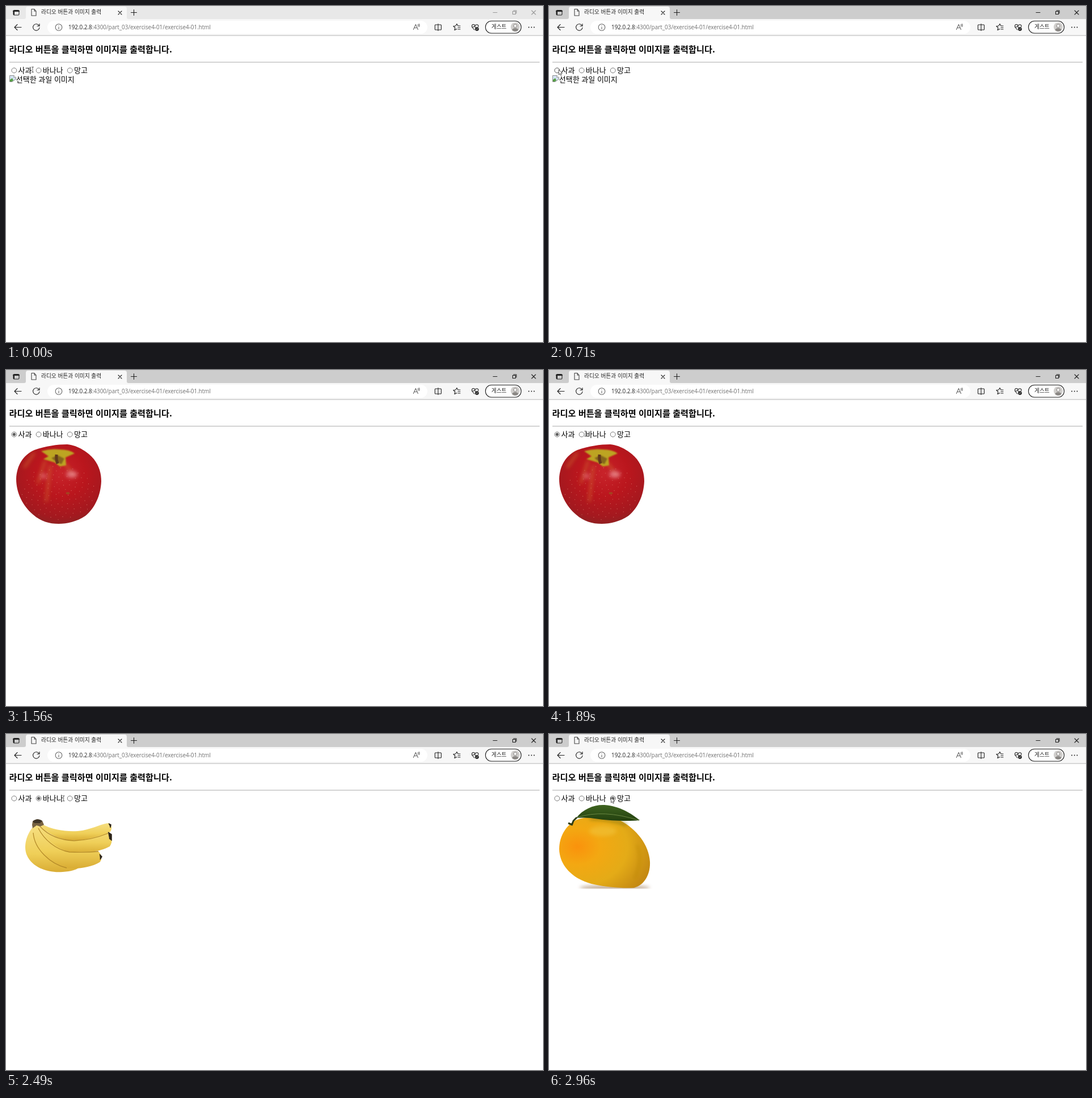
These frames come from a looping animation (947x592 px, 3830 ms). An HTML page:

```html
<!DOCTYPE html>
<html lang="ko">
<head>
<meta charset="utf-8">
<title>라디오 버튼과 이미지 출력</title>
<style>
  html, body { margin: 0; width: 100%; height: 100%; overflow: hidden; background: #fff; }
  svg { display: block; }
  text { font-family: "Noto Sans CJK KR", "Noto Sans CJK", sans-serif; font-size: 13px; }
  .line { fill: none; stroke: #222; stroke-width: 1.1; stroke-linecap: round; stroke-linejoin: round; }
  .small { font-size: 9.7px; fill: #222; }
  .url { font-family: "Open Sans", "Noto Sans", sans-serif; font-size: 9.9px; fill: #707070; }
  .ring { fill: #fff; stroke: #767676; }
  .dot { fill: #606060; }
</style>
</head>
<body>
<svg width="947" height="592" viewBox="0 0 947 592">
  <defs>
    <radialGradient id="red" cx=".52" cy=".36" r=".66">
      <stop offset="0" stop-color="#c8232a"/><stop offset=".45" stop-color="#ba161d"/>
      <stop offset=".85" stop-color="#a3191f"/><stop offset="1" stop-color="#8e2222"/>
    </radialGradient>
    <radialGradient id="gold" cx=".2" cy=".42" r=".85">
      <stop offset="0" stop-color="#fa920c"/><stop offset=".3" stop-color="#f3a812"/>
      <stop offset=".65" stop-color="#e4ab17"/><stop offset="1" stop-color="#c58a12"/>
    </radialGradient>
    <linearGradient id="yellow" x2="0" y2="1">
      <stop offset="0" stop-color="#f6df83"/><stop offset=".6" stop-color="#efcf58"/>
      <stop offset="1" stop-color="#d9ac34"/>
    </linearGradient>
    <linearGradient id="leaf" x2="0" y2="1">
      <stop offset="0" stop-color="#3f6420"/><stop offset="1" stop-color="#23400f"/>
    </linearGradient>
    <filter id="soft" x="-50%" y="-50%" width="200%" height="200%"><feGaussianBlur stdDeviation="3"/></filter>
    <filter id="edge"><feGaussianBlur stdDeviation="1.2"/></filter>
    <clipPath id="photo"><path d="M6 122H190V272.500H6Z"/></clipPath>
  </defs>

  <!-- title bar -->
  <path id="bar" d="M0 0H947V23H0Z"/>
  <path d="M32 23Q35 23 35 20V5Q35 1 39 1H209Q213 1 213 5V20Q213 23 216 23Z" fill="#f7f7f7"/>
  <g class="line">
    <rect x="13" y="7.500" width="10" height="8.500" rx="1.500"/>
    <path d="M13 9H23M14 9V15" stroke-width="2"/>
    <path d="M45 5.500H50L53 9V17H45ZM50 5.500V9H53" stroke="#444"/>
    <path d="M198 9L204 15M204 9L198 15M220.500 11.500H230.500M225.500 6.500V16.500"/>
  </g>
  <path id="buttons" class="line" d="M859 11.500H866M893.500 9.500H898.500V14.500H893.500ZM895 8H900V13M927 8L934 15M934 8L927 15"/>
  <text class="small" x="62" y="14.400">라디오 버튼과 이미지 출력</text>

  <!-- toolbar -->
  <path d="M0 23H947V52H0Z" fill="#f7f7f7"/>
  <path d="M0 52H947" stroke="#b4b4b4"/>
  <rect x="73" y="26" width="670" height="23" rx="11.500" fill="#fff"/>
  <g class="line">
    <path d="M27 37.500H15.500M20 32.500L15 37.500L20 42.500"/>
    <path d="M58.500 35A5.700 5.700 0 1 0 59 38M59 31.500V35.300H55"/>
    <g stroke="#666"><circle cx="93" cy="37.500" r="5.800"/><path d="M93 37V40.500M93 34.500V34.600"/></g>
    <path d="M718.500 41.500L722.500 32.500L726.500 41.500M720 38.500H725M726.500 32.500Q727.500 34 726.500 35.500M728.300 31.500Q730 34 728.300 36.500" stroke="#666"/>
    <path d="M761 33H757.500Q756.500 33 756.500 34V41Q756.500 42 757.500 42H761M763 33H766.500Q767.500 33 767.500 34V41Q767.500 42 766.500 42H763M762 31.500V43.500"/>
    <path d="M795 40.500L791 42.500L792 38.500L789 35.500L793 35L795 31.500L797 35H801M797 38H801M797 41H801"/>
    <path d="M826 42L822 37.500Q820.500 33 824 32.500Q826.500 32.500 827.500 34.500Q829 32 831.500 33Q834 34.500 832.500 37M822 37H825L826.500 35L828 38"/>
    <circle cx="830.500" cy="40.500" r="2.800" fill="#222"/><path d="M829.300 40.500L830.300 41.500L832 39.500" stroke="#fff" stroke-width=".8"/>
    <rect x="845.500" y="26.500" width="63" height="21.500" rx="10.700" style="fill:#fff"/>
  </g>
  <circle cx="898" cy="37" r="8" fill="#d0cecc"/>
  <path d="M892.500 42.500Q893 39 898 39Q903 39 903.500 42.500Q898 47.500 892.500 42.500Z" fill="#8b8885"/>
  <circle cx="898" cy="35" r="3" fill="#f0efee" stroke="#8b8885"/>
  <path d="M922 37.500h0M926.700 37.500h0M931.400 37.500h0" class="line" style="stroke-width:2"/>
  <text class="small" x="856" y="40.400">게스트</text>
  <text class="url" x="110" y="41"><tspan fill="#222">192.0.2.8</tspan>:4300/part_03/exercise4-01/exercise4-01.html</text>

  <!-- page -->
  <text x="5.500" y="81.500" style="font-size:15.200px;font-weight:700">라디오 버튼을 클릭하면 이미지를 출력합니다.</text>
  <path d="M6 99H941" stroke="#a8a8a8"/>
  <g id="radios"></g>

  <g id="alt">
    <path d="M6.500 122.500H14L17.500 126V129L14 131L11 133.500H6.500Z" fill="#d5e3f3" stroke="#8d8d8d"/>
    <path d="M7 133V130L11 127L13 131L10.500 133Z" fill="#56a045"/>
    <path d="M14 122.500V126H17.500" fill="#fff" stroke="#8d8d8d"/>
    <text x="17.800" y="133.700">선택한 과일 이미지</text>
  </g>

  <g id="apple">
    <path d="M18 192C19 168 30 150 50 141C70 134 90 131 108 131C128 133 146 146 155 157C165 170 168 183 168 196C167 222 156 244 140 257C125 267 108 271 93 271C76 271 62 267 48 255C30 240 18 217 18 192Z" fill="url(#red)"/>
    <g filter="url(#soft)">
      <path d="M69 160L56 200M78 168L71 232M103 164L121 187M50 146L32 172" fill="none" stroke="#d0662c" stroke-width="4" opacity=".65"/>
      <ellipse cx="116" cy="184" rx="10" ry="6" fill="#ee929a" opacity=".7"/>
      <ellipse cx="66" cy="187" rx="6" ry="5" fill="#e6737b" opacity=".6"/>
    </g>
    <g filter="url(#edge)">
      <path d="M62 143Q78 138 94 140Q112 140 121 147L105 154L106 168L95 170L86 163L66 157L75 152Z" fill="#bda424"/>
      <path d="M80 155L91 150L103 156L98 166L88 162Z" fill="#86651a"/>
    </g>
    <path d="M89 149Q88 157 91 165" fill="none" stroke="#63391b" stroke-width="5"/>
    <ellipse cx="109" cy="217" rx="3.500" ry="2" fill="#a4421f"/>
    <g id="specks" fill="#e28f7c" opacity=".7"></g>
  </g>

  <g id="banana" fill="url(#yellow)">
    <path d="M48 163C34 180 31 200 37 214C47 236 75 245 100 243C115 242 124 239 128 236L70 210L54 165Z"/>
    <path d="M62 158C85 171 115 173 135 170C155 166 172 157 181 157C187 159 188 168 183 173C165 184 135 189 110 187C88 184 70 172 58 162Z"/>
    <path d="M58 162C75 178 95 187 120 188C145 187 165 178 180 175C187 178 189 190 183 198C165 208 135 211 112 211C85 205 62 185 54 165Z"/>
    <path d="M56 160C64 178 86 201 112 208C130 208 150 206 163 207C169 212 170 222 165 226C150 235 125 239 105 236C75 228 47 200 47 165Z"/>
    <path d="M60 163C76 180 96 187 120 188Q150 187 180 175M57 166C67 186 88 204 112 208Q140 209 163 207M48 174C50 203 78 229 107 236" fill="none" stroke="#b58b29" stroke-width="1.300"/>
    <path d="M47 154Q55 147 64 153L67 160L60 163L54 161L47 166L46 160Z" fill="#776242"/>
    <path d="M47 154Q55 147 64 153L60 157L50 157Z" fill="#3f3528"/>
    <path d="M181 158L185 160L184 165M180 173L186 177L186 187L182 184M165 212L169 216L166 221" fill="#2c241a" stroke="#2c241a" stroke-width="1.500"/>
  </g>

  <g id="mango" clip-path="url(#photo)">
    <ellipse cx="116" cy="271" rx="62" ry="5" fill="#a88a6a" filter="url(#soft)" opacity=".7"/>
    <path d="M45 153C30 162 18 180 18 203C19 235 45 256 75 264C100 270 130 272 150 271C168 266 179 248 178 225C176 195 155 168 125 152C105 144 65 143 45 153Z" fill="url(#gold)"/>
    <g filter="url(#soft)">
      <ellipse cx="95" cy="171" rx="24" ry="9" fill="#f2c437" opacity=".6"/>
      <path d="M155 195Q166 220 151 255" fill="none" stroke="#bd8712" stroke-width="4" opacity=".6"/>
      <path d="M72 149Q105 148 137 160" fill="none" stroke="#8a7413" stroke-width="5" opacity=".7"/>
    </g>
    <path d="M48 148C60 132 80 124 98 125C125 127 145 140 160 152C140 154 110 153 88 150C72 147 58 147 48 148Z" fill="url(#leaf)"/>
    <path d="M50 147Q95 132 158 152" fill="none" stroke="#6b8843"/>
    <path d="M49 147L43 153L40 161M34 157L41 160" fill="none" stroke="#2f3d17" stroke-width="3"/>
  </g>

  <g id="cursor">
    <path id="arrow" d="M0 0V9L2 7.200L3.500 10.300L5 9.600L3.600 6.600H6.300Z" fill="#fff" stroke="#333" stroke-width=".8"/>
    <path id="beam" d="M-2 -4.500H2M0 -4.500V4.500M-2 4.500H2" fill="none" stroke="#555" stroke-width=".9"/>
  </g>
</svg>
<script>
const $ = id => document.getElementById(id);
const show = (el, on) => el.style.display = on ? '' : 'none';
const LOOP = 3830, STEP = 65.75, LEAD = 13;

const options = [[14.3, 21.6, '사과'], [57.6, 64.8, '바나나'], [112.7, 120, '망고']];
$('radios').innerHTML = options.map(([cx, x, label]) =>
  `<circle class="ring" cx="${cx}" cy="113.5" r="4.4"/>
   <circle class="dot" cx="${cx}" cy="113.5" r="2.7"/>
   <text x="${x}" y="118.2">${label}</text>`).join('');
const rings = document.querySelectorAll('.ring'), dots = document.querySelectorAll('.dot');

// pale specks scattered over the apple by the golden angle
$('specks').innerHTML = Array.from({ length: 110 }, (_, i) => {
  const r = Math.sqrt(i / 110), a = i * 2.39996;
  return `<circle cx="${93 + 66 * r * Math.cos(a)}" cy="${216 + 48 * r * Math.sin(a)}" r=".6"/>`;
}).join('');

// each fruit and the time of its click
const fruits = [['apple', 1040], ['banana', 1960], ['mango', 2960]];

// time, x, y of the pointer
const path = [
  [0, 47, 112], [270, 47, 112], [710, 17.5, 112], [910, 12.5, 113], [1090, 12.5, 113],
  [1430, 71, 112.5], [1560, 71, 113], [1960, 61.5, 112], [2040, 61, 112.5],
  [2490, 101.5, 113.5], [2620, 103, 113], [2960, 109.5, 112], [LOOP, 109.5, 112]
];

function pointer(t) {
  const i = path.findIndex(p => p[0] > t);
  const a = path[i - 1], b = path[i], k = (t - a[0]) / (b[0] - a[0]);
  return [a[1] + (b[1] - a[1]) * k, a[2] + (b[2] - a[2]) * k];
}

function draw(now) {
  const t = now % LOOP;
  const active = t >= 70;
  $('bar').setAttribute('fill', active ? '#cdcdcd' : '#e8e8e8');
  $('buttons').style.stroke = active ? '#222' : '#999';

  const [x, y] = pointer(Math.floor((t + LEAD) / STEP) * STEP);
  const picked = fruits.filter(f => t >= f[1]).length - 1;
  const over = options.findIndex(o => Math.abs(x - o[0]) < 5);
  show($('alt'), picked < 0);
  fruits.forEach(([id], i) => {
    show($(id), i === picked);
    show(dots[i], i === picked);
    rings[i].style.stroke = i === over ? '#4f4f4f' : '#767676';
  });

  $('cursor').setAttribute('transform', `translate(${x} ${y})`);
  show($('arrow'), over >= 0);
  show($('beam'), over < 0);
}

const start = performance.now();
function tick() {
  draw(performance.now() - start);
  requestAnimationFrame(tick);
}
tick();
</script>
</body>
</html>
```
